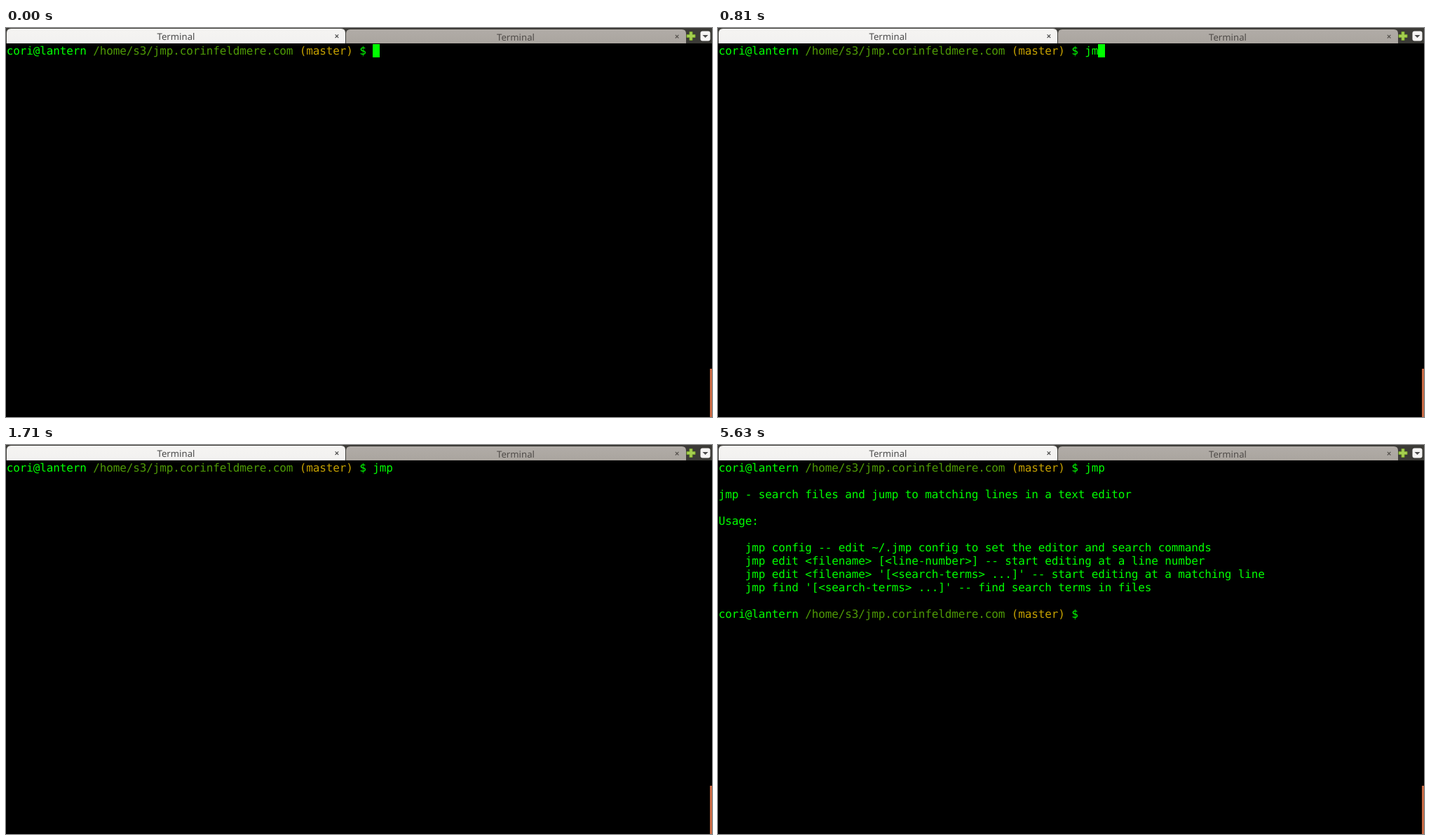
An HTML page for the animation above (7990 ms loop, 1007 by 556 pixels).

```html
<!DOCTYPE html>
<html lang="en">
<head>
<meta charset="utf-8">
<title>Terminal</title>
<style>
  html, body { margin: 0; width: 100%; height: 100%; overflow: hidden; background: #000; }
  svg { display: block; width: 1007px; height: 556px; }
  text { white-space: pre; text-rendering: geometricPrecision; }
  #screen text { font: 16px "DejaVu Sans Mono", monospace; fill: #00ff00; }
  .tab { font: 13.2px "Noto Sans", sans-serif; text-anchor: middle; }
  #screen .path { fill: #4e9a06; }
  #screen .branch { fill: #c4a000; }
</style>
</head>
<body>
<svg viewBox="0 0 1007 556">
  <defs>
    <linearGradient id="front" x2="0" y2="1">
      <stop offset="0" stop-color="#f5f4f2"/>
      <stop offset="1" stop-color="#f2f1f0"/>
    </linearGradient>
    <linearGradient id="back" x2="0" y2="1">
      <stop offset="0" stop-color="#b1aca7"/>
      <stop offset="1" stop-color="#aaa59f"/>
    </linearGradient>
  </defs>
  <rect width="1007" height="556"/>
  <rect width="1007" height="22" fill="#3c3b37"/>
  <path d="M485 22V8q0-6 6-6H964q6 0 6 6V22z" fill="url(#back)"/>
  <path d="M1 22V7q0-6 6-6H478q6 0 6 6V22z" fill="url(#front)"/>
  <path d="M484.5 22V7" stroke="#3c3b37"/>
  <text class="tab" x="242.5" y="17" fill="#4c4c4c">Terminal</text>
  <text class="tab" x="727" y="17.6" fill="#504c49">Terminal</text>
  <path d="M469.6 9.4l4.6 4.6m0-4.6l-4.6 4.6" stroke="#4c4c4c" stroke-width="1.1"/>
  <path d="M954.8 9.9l4.6 4.6m0-4.6l-4.6 4.6" stroke="#55514d" stroke-width="1.1"/>
  <path d="M975 5.5h4v4h4v4h-4v4h-4v-4h-4v-4h4z" fill="#a5cf50" stroke="#78a32c"/>
  <rect x="990.5" y="4.5" width="14" height="14" rx="3" fill="#f6f5f4"/>
  <path d="M993.5 10h8l-4 4z" fill="#4c4c4c"/>
  <rect x="1004" y="487" width="3" height="69" fill="#c86a45"/>
  <g id="screen"></g>
  <rect id="cursor" y="23" height="19" fill="#00ff00"/>
</svg>
<script>
const LOOP = 7990, LEFT = 0.7, CELL = 9.5, ROW = 19, BASE = 38;
const COLS = 106, PROMPT_COLS = 55;
const KEYS = [[500, "j"], [810, "m"], [880, "p"]];
const CURSOR_OFF = 1710, OUTPUT_AT = 1990, PROMPT_AT = 2090;

const screen = document.getElementById("screen");
const cursor = document.getElementById("cursor");

// Left edge of every column in the character grid
const columns = Array.from({ length: COLS }, (_, i) => LEFT + i * CELL);

function make(tag, parent, attrs, content = "") {
  const el = document.createElementNS("http://www.w3.org/2000/svg", tag);
  for (const key in attrs) el.setAttribute(key, attrs[key]);
  el.textContent = content;
  return parent.appendChild(el);
}

function line(row, content, col = 0, parent = screen) {
  return make("text", parent, { x: columns.slice(col).join(" "), y: BASE + row * ROW }, content);
}

function prompt(row) {
  const el = line(row, "cori@lantern ");
  make("tspan", el, { class: "path" }, "/home/s3/jmp.corinfeldmere.com ");
  make("tspan", el, { class: "branch" }, "(master) ");
  make("tspan", el, {}, "$");
  return el;
}

prompt(0);
const command = line(0, "", PROMPT_COLS);
const output = make("g", screen, {});
[
  [2, 0, "jmp - search files and jump to matching lines in a text editor"],
  [4, 0, "Usage:"],
  [6, 4, "jmp config -- edit ~/.jmp config to set the editor and search commands"],
  [7, 4, "jmp edit <filename> [<line-number>] -- start editing at a line number"],
  [8, 4, "jmp edit <filename> '[<search-terms> ...]' -- start editing at a matching line"],
  [9, 4, "jmp find '[<search-terms> ...]' -- find search terms in files"]
].forEach(([row, col, content]) => line(row, content, col, output));
const nextPrompt = prompt(11);

function show(el, on) {
  el.setAttribute("visibility", on ? "visible" : "hidden");
}

function placeCursor(col) {
  const x = Math.round(columns[col]);
  cursor.setAttribute("x", x);
  cursor.setAttribute("width", Math.round(columns[col + 1]) - x);
}

function draw(t) {
  const typed = KEYS.filter(([at]) => t >= at).map(([, key]) => key).join("");
  command.textContent = typed;
  placeCursor(PROMPT_COLS + typed.length);
  show(cursor, t < CURSOR_OFF);
  show(output, t >= OUTPUT_AT);
  show(nextPrompt, t >= PROMPT_AT);
}

const start = performance.now();
function tick() {
  draw((performance.now() - start) % LOOP);
  requestAnimationFrame(tick);
}
tick();
</script>
</body>
</html>
```
